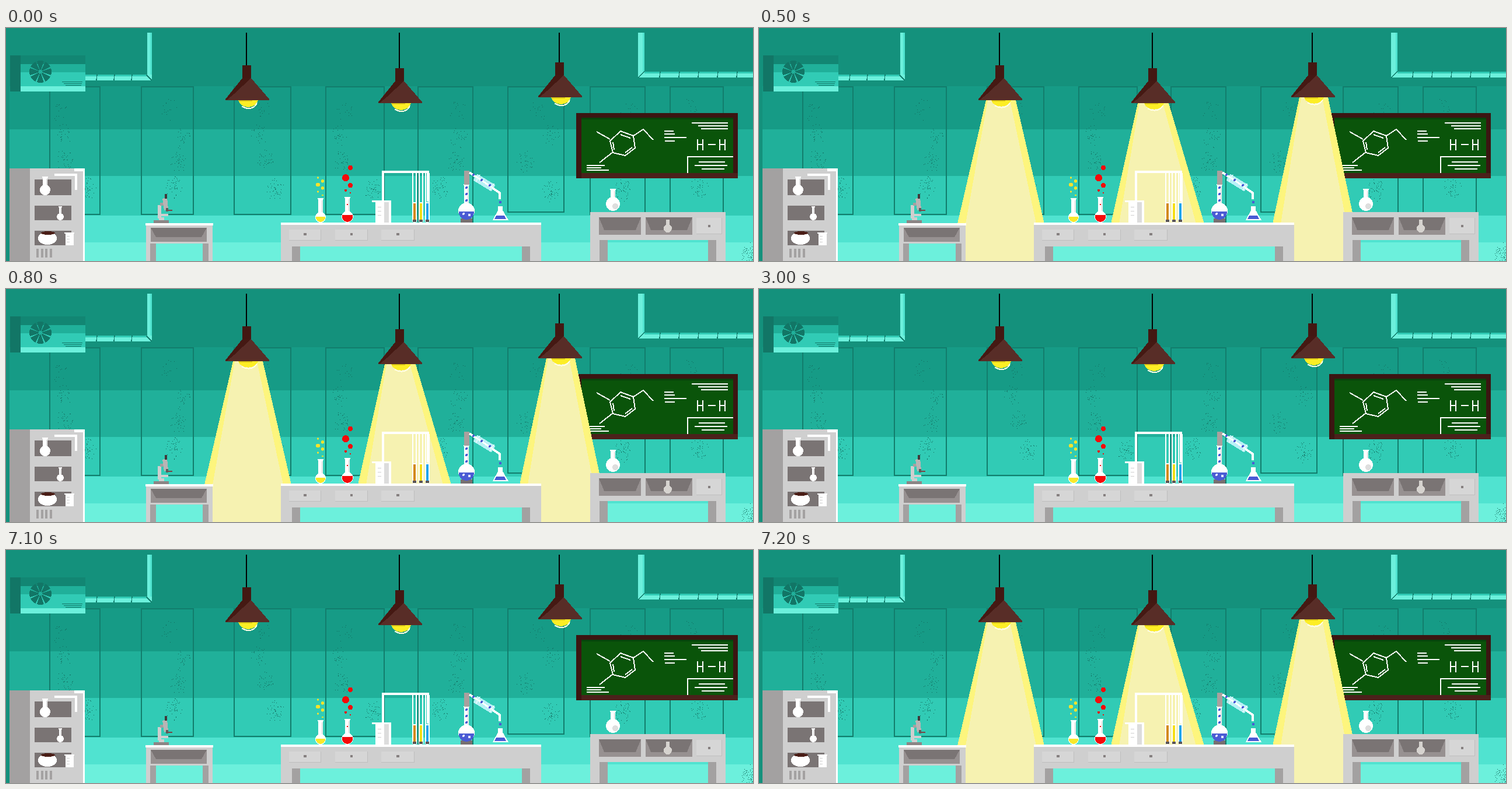
Write an HTML page that moves like this. It is 1280 px wide and 400 px high and loops after 7300 ms.

```html
<!DOCTYPE html>
<html lang="en">
<head>
<meta charset="utf-8">
<title>Laboratory lights</title>
<style>
  html, body { margin: 0; width: 100%; height: 100%; overflow: hidden; background: #14917c; }
  svg { display: block; width: 1280px; height: 400px; shape-rendering: crispEdges; }
</style>
</head>
<body>
<svg id="stage" viewBox="0 0 1280 400"></svg>
<script>
const LIGHT = '#cfcfcf', GREY = '#a3a1a1', DARK = '#7a7474', WHITE = '#fff';
const MINT = '#6cf0dc', SHADE = '#127666', BLUE = '#4a5bd4', YELLOW = '#fdee25';

const rect = (x, y, x2, y2, fill) =>
  `<rect x="${x}" y="${y}" width="${x2 - x}" height="${y2 - y}" fill="${fill}"/>`;
const poly = (points, fill) => `<polygon points="${points}" fill="${fill}"/>`;
const dot = (x, y, r, fill, ry = r) =>
  `<ellipse cx="${x}" cy="${y}" rx="${r}" ry="${ry}" fill="${fill}"/>`;
const line = (d, color = WHITE, width = 2) =>
  `<path d="${d}" fill="none" stroke="${color}" stroke-width="${width}"/>`;
const group = (x, y, body) => `<g transform="translate(${x} ${y})">${body}</g>`;
const each = (items, draw) => items.map(draw).join('');
const repeat = (n, draw) => Array.from({ length: n }, (_, i) => draw(i)).join('');

let seed = 7;
const random = () => (seed = seed * 16807 % 2147483647) / 2147483647;

function speckle(x, y, radius, count) {
  const d = repeat(count, () => {
    const angle = random() * 2 * Math.PI, dist = radius * random() ** 0.7;
    return `M${Math.round(x + dist * Math.cos(angle))} ${Math.round(y + 1.3 * dist * Math.sin(angle))}h1v1h-1z`;
  });
  return `<path d="${d}" fill="#12685b"/>`;
}

function wall() {
  const bands = [[0, '#14917c'], [100, '#169b86'], [174, '#20b09a'],
                 [254, '#31cbb5'], [322, '#50e3d0'], [368, MINT]];
  const panels = [[75, 161], [232, 321], [391, 488], [548, 648],
                  [706, 800, 340], [860, 956, 316], [1001, 1095], [1138, 1229]];
  // Each panel is worn in four places, more so towards the floor.
  const wear = ([left, right]) => repeat(4, i => {
    const x = left + 16 + random() * (right - left - 32);
    return speckle(x, 135 + 45 * i + 10 * random(), 15, 16 + 9 * i);
  });
  return each(bands, ([y, c]) => rect(6, y, 1280, 400, c)) + rect(0, 0, 6, 400, '#14917c') +
    each(panels, ([l, r, b = 320]) => line(`M${l} 101H${r}V${b}H${l}Z`, '#127d6c')) +
    each(panels, wear) + speckle(1280, 392, 20, 130);
}

// An upright pipe from the ceiling that bends into a run of jointed lengths.
function pipe(x, width, left, right, y, joint, spacing, count) {
  return rect(left, y, right, y + 10, MINT) + rect(left, y, right, y + 3, '#31cbb5') +
    rect(x, 8, x + width, y + 10, MINT) + rect(x + width - 3, 8, x + width, y, '#50e3d0') +
    line(repeat(count, i => `M${joint + i * spacing} ${y}l-1 10`), '#127d6c', 1.5);
}

function ventilation() {
  const blade = i => `<path d="M59 75L77 69A19 19 0 0 1 77 81Z" transform="rotate(${i * 45} 59 75)" fill="${SHADE}"/>`;
  return rect(7, 47, 25, 109, SHADE) + rect(25, 47, 136, 62, '#128673') +
    rect(25, 62, 136, 76, '#20b09a') + rect(25, 76, 136, 100, '#31cbb5') + rect(25, 100, 136, 109, MINT) +
    repeat(8, blade) + dot(59, 75, 3, '#20b09a') +
    line(repeat(3, i => `M${96 + 3 * i} ${92.5 + 3 * i}H${131 - i}`), SHADE, 1) +
    pipe(242, 8, 136, 250, 80, 156, 30, 3) + line('M241 81L250 90', '#127d6c', 1.5) +
    pipe(1083, 11, 1083, 1280, 75, 1121, 33, 5) + line('M1094 75L1083 85', '#127d6c', 1.5);
}

function blackboard() {
  const hydrogen = x => `M${x} 191V210M${x} 200H${x + 9}M${x + 9} 191V210`;
  return rect(977, 146, 1254, 258, '#3b1612') + rect(986, 249, 1254, 258, '#4b211b') +
    rect(986, 154, 1246, 249, '#0a540a') + rect(986, 154, 1246, 157, '#07440b') +
    line('M1053 177L1075 185L1078 206L1061 219L1040 214L1035 194Z' +
      'M1053 183L1070 189M1073 205L1061 214M1040 196L1042 209' +
      'M1012 178L1035 191M1075 185L1092 174L1109 192M1040 213L1017 231') +
    line('M995 236H1026M995 240H1020M995 244H1033' +
      'M1128 177H1144M1128 182H1146M1128 188H1166M1129 194H1146' +
      'M1175 163H1237M1186 168H1237M1191 173H1237' +
      'M1187 230H1232M1180 236H1236M1192 242H1231M1168 249V221H1246', WHITE, 1.5) +
    line(hydrogen(1185) + 'M1203 200H1216' + hydrogen(1223));
}

// Bulb flask centred at x, y; liquid fills the part below `level`.
function flask(x, y, r, neck, top, liquid, level = 0) {
  const half = Math.sqrt(r * r - level * level) - 1;
  return group(x, y, dot(0, 0, r, WHITE) + rect(-neck, top, neck, 0, WHITE) +
    rect(-neck - 1, top, neck + 1, top + 2, WHITE) + rect(neck - 2, top + 4, neck - 1, -r, LIGHT) +
    (liquid ? `<path d="M${-half} ${level}A${r - 1} ${r - 1} 0 1 0 ${half} ${level}Z" fill="${liquid}"/>` : ''));
}

const niche = (x, y, x2, y2) => rect(x, y, x2, y2, '#979191') +
  poly(`${x},${y} ${x2},${y} ${x2 - 9},${y2 - 8} ${x + 9},${y2 - 8}`, DARK) + rect(x + 9, y, x2 - 9, y2 - 8, DARK);

function cabinet() {
  return rect(6, 241, 41, 400, GREY) + rect(41, 241, 135, 400, LIGHT) +
    rect(117, 241, 135, 246, WHITE) + rect(132, 241, 135, 400, WHITE) +
    rect(49, 260, 112, 287, DARK) + rect(49, 305, 112, 330, DARK) + rect(49, 348, 112, 373, DARK) +
    line('M83 252H120V278', WHITE, 4) +
    flask(67, 278, 9, 4, -23) + flask(93, 324, 6, 2, -18) +
    dot(71, 361, 16, WHITE, 11) + dot(72, 352, 12, '#4a1d16', 3) +
    rect(102, 351, 116, 373, WHITE) + rect(100, 351, 117, 353, WHITE) +
    line(repeat(3, i => `M104 ${357.5 + 5 * i}h5`), LIGHT, 1) +
    repeat(4, i => rect(52 + 7.5 * i, 379, 56 + 7.5 * i, 394, GREY));
}

const desk = (l, r, top, bottom, light, dark) => rect(l, top, r, bottom, LIGHT) +
  rect(l, bottom, l + light, 400, LIGHT) + rect(l + light, bottom, l + light + dark, 400, GREY) +
  rect(r - light, bottom, r, 400, LIGHT) + rect(r - light - dark, bottom, r - light, 400, GREY);

const drawer = (x, x2, y, y2, knob) => rect(x, y, x2, y2, '#d6d6d6') +
  line(`M${x} ${y2 - .5}H${x2 - .5}V${y}`, '#bebebe', 1) + dot((x + x2) / 2, knob, 2.5, '#868080');

function tables() {
  return desk(240, 354, 338, 370, 7, 10) + rect(239, 335, 355, 339, WHITE) + niche(248, 343, 344, 367) +
    desk(471, 917, 337, 375, 19, 14) + rect(471, 334, 917, 338, WHITE) +
    repeat(3, i => drawer(485 + 79 * i, 540 + 80 * i, 346, 365, 354)) +
    desk(1001, 1233, 316, 364, 16, 14) + niche(1016, 325, 1088, 355) + niche(1096, 325, 1176, 355) +
    drawer(1183, 1227, 326, 354, 340) +
    dot(1134, 344, 7, '#d6d3cf') + rect(1131, 329, 1137, 340, '#d6d3cf');
}

function microscope() {
  return rect(253, 330, 279, 335, '#8b8585') + rect(262, 325, 271, 330, LIGHT) +
    rect(260, 304, 266, 327, LIGHT) + rect(264, 300, 273, 305, GREY) + rect(265, 319, 278, 323, LIGHT) +
    poly('268,293 276,291 278,311 271,313', '#b8b5b5') + rect(272, 285, 276, 293, '#403a3a') +
    rect(274, 309, 278, 315, '#605858') + rect(278, 312, 285, 314, '#7c4345');
}

// Bubbles zigzag upwards and are largest near the fourth.
const plume = (x, count, height, small, grow, color) => repeat(count, i =>
  dot(x + (i % 2 ? -4 : 4), height(i), small + grow * Math.exp(-((i - 3) ** 2) / 2), color));

const tube = (x, color) => line(`M${x + 1} 249V333M${x + 7} 249V333`) +
  rect(x + 2, 299, x + 6, 334, WHITE) + rect(x + 2, 301, x + 6, 329, color) + rect(x + 1, 329, x + 7, 333, '#5a5555');

function glassware() {
  const drops = (x, y, dx, dy) => repeat(3, i => dot(x + dx * i, y + dy * i, 2, BLUE));
  return flask(539, 325, 9, 4, -33, '#f8e82a', -1) +
    plume(538.5, 6, i => 287 - 6 * i, 1.3, 2.2, '#f8e22a') +
    flask(585, 324, 10, 4, -34, '#f50a0a', -3) +
    plume(586, 5, i => 283 - 2 * i - 2.2 * i * i, 1.5, 4.5, '#f50a0a') + dot(585, 303, 1, '#f50a0a') +
    line('M646 297V247H723V298', WHITE, 4) +
    rect(633, 297, 660, 334, WHITE) + rect(648, 299, 656, 334, '#dcdcdc') + rect(627, 296, 660, 299, WHITE) +
    line(repeat(3, i => `M637 ${307.5 + 7 * i}h6`), LIGHT, 1) +
    each(['#d2880f', '#f6df17', '#1da4ee'], (c) => c).replace(/#\w{6}/g, (c, at) => tube(696 + at / 7 * 11, c)) +
    rect(779, 327, 799, 334, '#777070') + flask(789, 314, 14, 4, -46, BLUE, 1) + drops(789, 274, 0, 11) +
    dot(784, 319, 2, '#dfe4ff') + dot(794, 321, 2.5, '#dfe4ff') + rect(785, 245, 794, 269, '#a9a09e') +
    line('M794 248L846 283V294', WHITE, 4) + line('M804 256L835 275', '#b9f1f6', 13) +
    line('M801 252L839 278', WHITE, 3) + drops(801, 252, 14, 9) +
    line('M812 252L805 264M836 267L829 279', '#dffafa') + dot(847, 299, 2.5, BLUE) +
    rect(843, 306, 851, 314, WHITE) + poly('844,311 850,311 861,330 834,330', WHITE) +
    poly('840,322 854,322 857,328 837,328', BLUE) +
    flask(1040, 302, 12, 4, -26) + dot(1044, 306, 5, '#dedede');
}

// Lamps are drawn at the first position and moved to the others.
const lamps = draw => each([[0, 0], [262, 5], [536, -5]], ([x, y]) => group(x, y, draw(y)));
const bulb = depth => `<path d="M398 124A17.5 ${depth} 0 0 0 432 124Z" fill="${YELLOW}"/>` +
  rect(399, 124, 422, 126, '#dcc816') +
  line(`M404 ${122 + depth * .8}Q412 ${124 + depth} 420 ${122 + depth}Q428 ${120 + depth} 430 128`, '#fffde2');
const shade = y => rect(411, 8 - y, 413, 66, '#000') + rect(405, 64, 420, 87, '#431812') +
  poly('405,86 420,86 451,122 451,124 376,124 376,122', '#582d27') +
  poly('405,86 420,86 391,113 379,123 376,123', '#451913');

function beam(left, right, top, footLeft, footRight) {
  const cone = (a, b, foot) => `${left + a},${top} ${footLeft + foot},336 ${footRight - foot},336 ${right - b},${top}`;
  return poly(cone(0, 0, 0), '#fdf57d') + poly(cone(3, 10, 14), '#f6f2b1');
}

const beams = () => beam(389, 440, 124, 340, 489) + beam(649, 702, 129, 603, 763) +
  beam(926, 975, 119, 880, 1021) + rect(354, 336, 471, 400, '#f6f2b1') +
  rect(917, 336, 1001, 400, '#f6f2b1') + lamps(() => bulb(14));

document.getElementById('stage').innerHTML = wall() + ventilation() + blackboard() +
  lamps(() => bulb(15.5)) + `<g id="beams">${beams()}</g>` + lamps(shade) +
  cabinet() + tables() + microscope() + glassware();

// The lights start off and flip at every listed time.
const LOOP = 7300;
const flips = [0, 500, 700, 800, 3000, 7000, 7100, 7200];
document.getElementById('beams').animate(
  [...flips.map((time, i) => ({ offset: time / LOOP, opacity: i % 2, easing: 'step-end' })), { offset: 1, opacity: 1 }],
  { duration: LOOP, iterations: Infinity });
</script>
</body>
</html>
```
